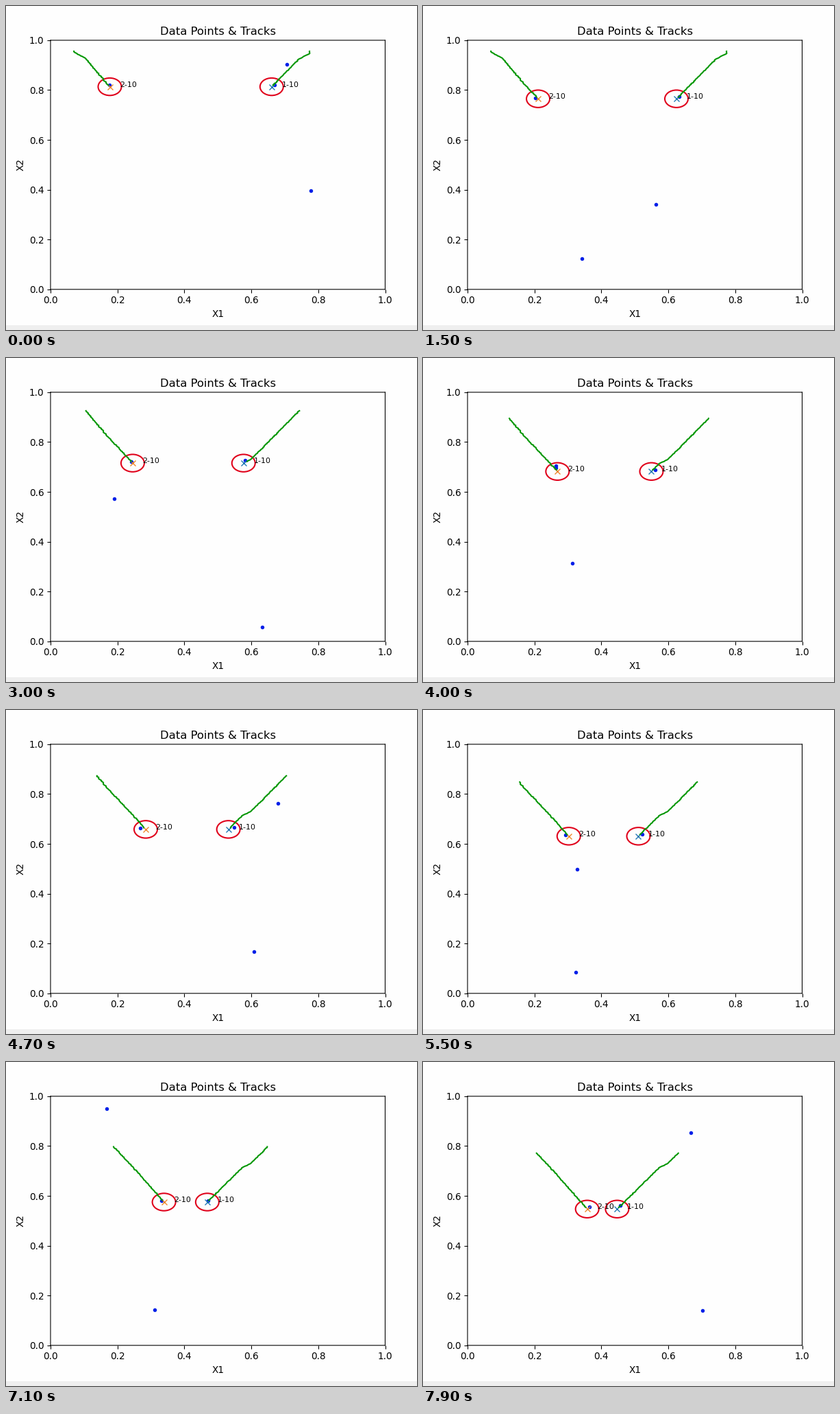
Recreate the animation shown at these times as a matplotlib script. Size 600 px wide and 472 px high, loop 8 s.

```python
import numpy as np
import matplotlib.pyplot as plt
from matplotlib.animation import FuncAnimation
from matplotlib.patches import Ellipse, Rectangle

W, H, DPI = 600, 472, 64
FRAMES, STEP = 80, 100
K = 98.5 / DPI  # point sizes as on a 98.5 dpi canvas
LEFT, RIGHT, TOP, BOTTOM = 65.0, 553.5, 49.9, 412.8
BIRTH, MEMORY, LAG = -46, 66, 2  # trail start, length and delay in steps

plt.rcParams.update({
    "font.family": "DejaVu Sans", "font.size": 10 * K,
    "axes.titlesize": 12 * K, "axes.titlepad": 6 * K,
    "axes.labelpad": 4 * K, "axes.linewidth": 0.8 * K,
    "lines.linewidth": 1.5 * K, "lines.markersize": 6 * K,
    "lines.markeredgewidth": K,
})
for side in ("xtick", "ytick"):
    plt.rcParams.update({f"{side}.major.size": 3.5 * K,
                         f"{side}.major.width": 0.8 * K,
                         f"{side}.major.pad": 3.5 * K})

fig = plt.figure(figsize=(W / DPI, H / DPI), dpi=DPI, facecolor="#fefefe")
ax = fig.add_axes([LEFT / W, 1 - BOTTOM / H,
                   (RIGHT - LEFT) / W, (BOTTOM - TOP) / H],
                  facecolor="#fefefe")
ax.set(xlim=(0, 1), ylim=(0, 1), xlabel="X1", ylabel="X2",
       title="Data Points & Tracks")
for spine in ax.spines.values():
    spine.set_snap(False)

# Overlay in pixel coordinates, y pointing down
stage = fig.add_axes([0, 0, 1, 1])
stage.set(xlim=(0, W), ylim=(H, 0))
stage.axis("off")
stage.add_patch(Rectangle((0, 465), W, 7, color="#efefef", lw=0))


def height(t):
    """Both targets sink at the same, slowly growing speed."""
    return 117.6 + 1.16 * t + 0.0008 * t * t


class Track:
    """A target with a trail, a gate, an estimate and noisy detections."""

    def __init__(self, label, color, path, bias, spread, seed):
        rng = np.random.default_rng(seed)
        px, py = np.transpose(path)
        self.t = np.arange(BIRTH, FRAMES)
        self.y = height(self.t)
        self.x = np.interp(self.y, py, px)
        self.wobble = rng.normal(0, 0.5, len(self.t))
        now = self.t >= 0
        self.hits = (np.column_stack([self.x[now], self.y[now]])
                     + rng.normal(bias, spread, (FRAMES, 2)))
        self.gate = stage.add_patch(
            Ellipse((0, 0), 34, 25.4, fill=False, ec="#e0001a", lw=1.5 * K))
        self.cross, = stage.plot([], [], "x", color=color, zorder=3)
        self.trail, = stage.plot([], [], color="#009600", zorder=4)
        self.text = stage.text(0, 0, label, fontsize=8 * K, zorder=5)

    def update(self, n):
        x, y = self.x[n - BIRTH], self.y[n - BIRTH]
        part = (self.t >= n - MEMORY) & (self.t <= n - LAG)
        self.trail.set_data((self.x + self.wobble)[part], self.y[part])
        self.cross.set_data([x], [y])
        self.gate.set_center((x, y))
        self.text.set_position((x + 14.7, y))


tracks = [
    Track("1-10", "C0",
          [(443.5, 69), (428, 77), (393, 112.5), (357, 148), (345, 154),
           (283, 214.6)],
          bias=(4.2, -3.1), spread=(1.6, 1), seed=5),
    Track("2-10", "#ee862a",
          [(100, 67), (116, 76.5), (150, 116), (197, 166), (240, 214.6)],
          bias=(-1, -2.6), spread=(2.6, 1.4), seed=8),
]

# Two false alarms anywhere in the plot at every step
clutter = np.random.default_rng(21).uniform(
    (LEFT + 3, TOP + 3), (RIGHT - 3, BOTTOM - 3), (FRAMES, 2, 2))
dots, = stage.plot([], [], ".", color="#0020e8", zorder=2)


def update(n):
    for track in tracks:
        track.update(n)
    pts = np.vstack([clutter[n]] + [t.hits[n] for t in tracks])
    dots.set_data(pts[:, 0], pts[:, 1])
    return []


anim = FuncAnimation(fig, update, frames=FRAMES, interval=STEP,
                     init_func=lambda: update(0), repeat=True, repeat_delay=0)
plt.show()
```
